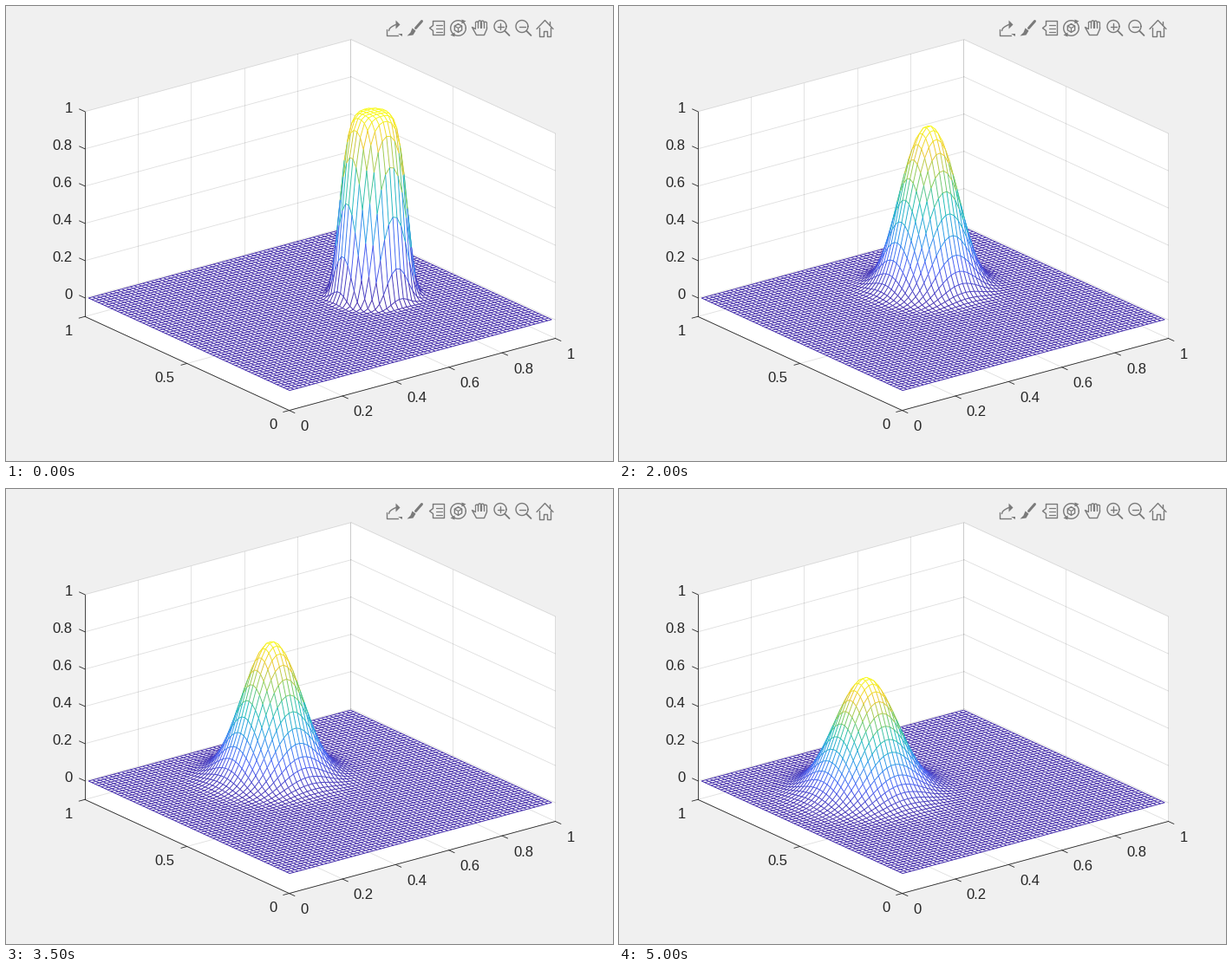
Write a matplotlib script that moves like this. It is 700 px wide and 525 px high and loops after 5.5 s.

```python
import numpy as np
import matplotlib.pyplot as plt
from matplotlib.animation import FuncAnimation
from matplotlib.collections import PolyCollection
from matplotlib.colors import LinearSegmentedColormap
from matplotlib.patches import Polygon

W, H, DPI = 700, 525, 100
PX = 72 / DPI                     # points per pixel
FRAMES, STEP_MS = 11, 500
N = 64                            # grid cells per side
TURN = 2 * np.pi / 25.6           # rotation per frame
INK, ICON = "#262626", "#7a7a7a"
Z_MIN = -0.1

SCALE = LinearSegmentedColormap.from_list("scale", [
    "#3e26a8", "#435bf5", "#2797eb", "#1cbdb8", "#81cc59", "#ecc62c",
    "#f9fb15"])

# Axes box, stretched to fill its rectangle, seen from az -37.5, el 30
AZ, EL = np.radians(37.5), np.radians(30)
LEFT, BOTTOM = 0.13 * W, 466.6
ACROSS = 0.775 * W / (np.cos(AZ) + np.sin(AZ))
UP = 0.815 * H / ((np.cos(AZ) + np.sin(AZ)) * np.sin(EL) + np.cos(EL))

plt.rcParams["font.family"] = "Liberation Sans"
fig = plt.figure(figsize=(W / DPI, H / DPI), dpi=DPI, facecolor="#f0f0f0")
ax = fig.add_axes([0, 0, 1, 1])
ax.set_xlim(0, W)
ax.set_ylim(H, 0)
ax.axis("off")


def project(x, y, z):
    """Orthographic view of the unit box, in stage pixels."""
    height = (z - Z_MIN) / (1 - Z_MIN)
    u = LEFT + ACROSS * (np.cos(AZ) * x + np.sin(AZ) * (1 - y))
    v = BOTTOM - UP * (np.sin(EL) * (np.sin(AZ) * x + np.cos(AZ) * y)
                       + np.cos(EL) * height)
    return np.stack(np.broadcast_arrays(u, v), axis=-1)


def line(pts, width=0.83, color=INK, **kw):
    pts = np.array(pts, float)
    if np.ptp(pts[:, 0]) < 1e-6:          # keep upright lines on one pixel
        pts[:, 0] = np.floor(pts[:, 0] + 1e-6)
    ax.plot(pts[:, 0], pts[:, 1], color=color, lw=width * PX, **kw)


def fill(pts, color):
    ax.add_patch(Polygon(pts, closed=True, fc=color, lw=0))


def edge3d(a, b, **kw):
    line([project(*a), project(*b)], **kw)


def tick(value, p, toward, offset, align):
    step = toward / np.hypot(*toward)
    line([p, p + 7 * step])
    x, y = p + offset
    ax.text(x, y + 6, f"{value:g}", fontsize=16.67 * PX, color=INK,
            ha=align, va="baseline")


def draw_box():
    outline = [(0, 0, Z_MIN), (1, 0, Z_MIN), (1, 0, 1),
               (1, 1, 1), (0, 1, 1), (0, 1, Z_MIN)]
    fill([project(*p) for p in outline], "white")

    corner = project(0, 0, Z_MIN)
    right = project(1, 0, Z_MIN) - corner
    back = project(0, 1, Z_MIN) - corner
    grid = dict(alpha=0.15, zorder=1.5)

    for t in np.linspace(0, 1, 6):
        edge3d((t, 0, Z_MIN), (t, 1, Z_MIN), **grid)
        edge3d((t, 1, Z_MIN), (t, 1, 1), **grid)
        edge3d((0, 1, t), (1, 1, t), **grid)
        edge3d((1, 0, t), (1, 1, t), **grid)
        tick(t, project(t, 0, Z_MIN), -back, (12.8, 17.4), "left")
        tick(t, project(0, 1, t), back, (-14.3, -4.4), "right")

    for t in (0, 0.5, 1):
        edge3d((0, t, Z_MIN), (1, t, Z_MIN), **grid)
        edge3d((1, t, Z_MIN), (1, t, 1), **grid)
        tick(t, project(0, t, Z_MIN), -right, (-14.3, 15.4), "right")

    edge3d((0, 0, Z_MIN), (1, 0, Z_MIN))
    edge3d((0, 0, Z_MIN), (0, 1, Z_MIN))
    edge3d((0, 1, Z_MIN), (0, 1, 1))


class Icon:
    """Pen working relative to the centre of one toolbar slot."""

    def __init__(self, slot):
        self.origin = np.array([446.5 + 25 * slot, 25.5])

    def stroke(self, *pts, width=1.4):
        line(self.origin + np.array(pts), width, ICON,
             solid_joinstyle="round", solid_capstyle="round")

    def blob(self, *pts):
        fill(self.origin + np.array(pts), ICON)

    def arc(self, x, y, r, start=0, end=360, points=40):
        a = np.radians(np.linspace(start, end, points))
        self.stroke(*zip(x + r * np.cos(a), y + r * np.sin(a)))


def export_icon(pen):
    pen.stroke((-8, 1), (-8, 8), (5, 8))
    t = np.linspace(0, 1, 12)
    pen.stroke(*zip(-5 + 8 * t, 3 - 7 * np.sqrt(t)))
    pen.blob((3, -9), (8, -4), (3, 1))
    pen.blob((5, 6), (10, 6), (10, 9))


def brush_icon(pen):
    pen.stroke((8, -8), (1, 0), width=3)
    pen.blob((-3, 0), (1, 3), (-2, 8), (-9, 9), (-5, 5))


def note_icon(pen):
    pen.stroke((-4, -8), (9, -8), (9, 8), (-4, 8), (-4, 3),
               (-8, 0), (-4, -3), (-4, -8))
    for y in (-4, 0, 4):
        pen.stroke((-1, y), (6, y), width=1.2)


def rotate_icon(pen):
    pen.arc(0, 0, 8.8)
    pen.arc(0, 0, 4.8, -90, 270, points=7)
    for a in np.radians((-30, 90, 210)):
        pen.stroke((0, 0), (4.8 * np.cos(a), 4.8 * np.sin(a)), width=1.2)
    for s in (-1, 1):
        pen.blob((4 * s, -10 * s), (9 * s, -8 * s), (4 * s, -5 * s))


def hand_icon(pen):
    for i in range(4):
        x, top = -3.5 + 3.3 * i, -7.5 + 1.2 * abs(i - 1.4)
        pen.arc(x, top, 1.6, 180, 360)
        for side in (-1.6, 1.6):
            pen.stroke((x + side, top), (x + side, -1), width=1.2)
    pen.stroke((-5, 1), (-9, -1), (-4, 8), (5, 8), (8, 1), (8, -1))


def zoom_icon(pen, plus):
    pen.arc(-1.5, -2, 7)
    pen.stroke((3.7, 3.2), (9, 8.5), width=1.8)
    pen.stroke((-5, -2), (2, -2))
    if plus:
        pen.stroke((-1.5, -5.5), (-1.5, 1.5))


def home_icon(pen):
    pen.stroke((-9.5, 1), (0, -9), (9.5, 1))
    pen.stroke((-6.5, -1), (-6.5, 9), (-2, 9), (-2, 3),
               (2, 3), (2, 9), (6.5, 9), (6.5, -1))
    pen.stroke((6, -4), (6, -8))


def draw_toolbar():
    icons = [export_icon, brush_icon, note_icon, rotate_icon, hand_icon,
             lambda pen: zoom_icon(pen, True),
             lambda pen: zoom_icon(pen, False), home_icon]
    for slot, icon in enumerate(icons):
        icon(Icon(slot))


cells = (np.arange(N) + 0.5) / N
X, Y = np.meshgrid(cells, cells)
freq = 2 * np.pi * np.fft.fftfreq(N, 1 / N)
K2 = freq[None, :] ** 2 + freq[:, None] ** 2


def hump(k):
    """Flat-topped bump carried round the centre while it diffuses."""
    cx, cy = 0.5 + 0.2 * np.cos(k * TURN), 0.5 + 0.2 * np.sin(k * TURN)
    u = 0.98 * np.exp(-(np.hypot(X - cx, Y - cy) / 0.1075) ** 5.4)
    if k == 0:
        return u
    spread = 0.00014 + 0.000475 * k
    return np.fft.ifft2(np.fft.fft2(u) * np.exp(-spread * K2 / 2)).real


def far_to_near(a):
    a = a[::-1, ::-1]
    return a.reshape(-1, *a.shape[2:])


def mesh_parts(z):
    """White facets, each followed by its two rear edges, far to near."""
    p = project(X, Y, z)
    rgba = SCALE((z - z.min()) / np.ptp(z))
    a, b = p[:-1, :-1], p[:-1, 1:]
    d, c = p[1:, :-1], p[1:, 1:]
    shapes = [(a, b, c, d), (d, c, c, c), (b, c, c, c)]
    verts = np.stack([far_to_near(np.stack(s, axis=2)) for s in shapes], 1)

    edge = np.zeros((len(verts), 3, 4))
    edge[:, 1] = far_to_near(rgba[1:, :-1])
    edge[:, 2] = far_to_near(rgba[:-1, 1:])
    face = np.zeros_like(edge)
    face[:, 0] = 1

    # the two front borders belong to no facet behind them
    border = [np.concatenate([p[0, ::-1], p[1:, 0]])]
    verts = list(verts.reshape(-1, 4, 2)) + border
    edge = np.vstack([edge.reshape(-1, 4), rgba[0, 0]])
    face = np.vstack([face.reshape(-1, 4), np.zeros(4)])
    return verts, face, edge


draw_box()
draw_toolbar()
mesh = PolyCollection([], closed=False, zorder=3)
mesh.set_linewidth(0.92 * PX)
ax.add_collection(mesh, autolim=False)


def update(k):
    verts, face, edge = mesh_parts(hump(k))
    mesh.set_verts(verts, closed=False)
    mesh.set_facecolor(face)
    mesh.set_edgecolor(edge)
    return mesh,


anim = FuncAnimation(fig, update, frames=FRAMES, interval=STEP_MS,
                     repeat=True, repeat_delay=0, blit=False)
plt.show()
```
